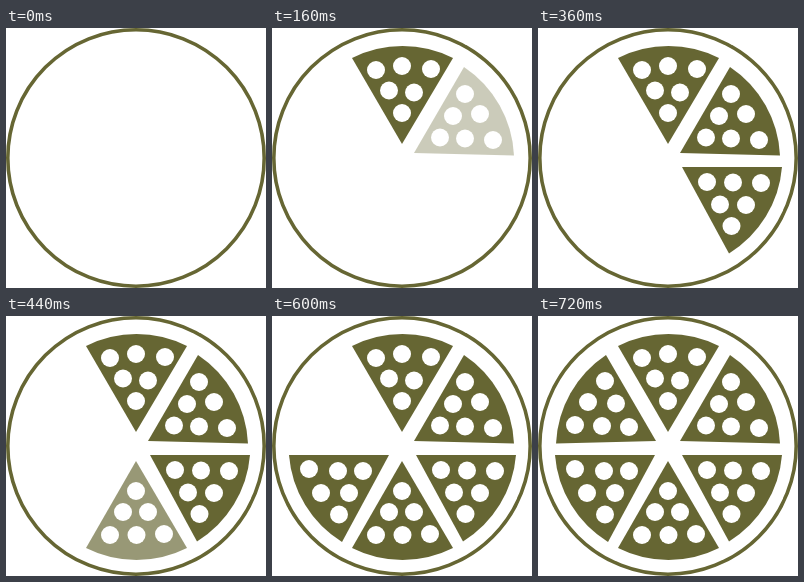
These frames come from a looping animation (260 px wide and 260 px high, 840 ms). An HTML page:

```html
<!DOCTYPE html>
<html lang="en">
<head>
<meta charset="utf-8">
<title>Slices</title>
<style>
  html, body { margin: 0; width: 100%; height: 100%; overflow: hidden; background: #fff; }
  svg { display: block; width: 100%; height: 100%; }
</style>
</head>
<body>
<svg id="stage" viewBox="0 0 260 260">
  <circle cx="130" cy="130" r="128.2" fill="none" stroke="#666633" stroke-width="3.6"/>
</svg>
<script>
const NS = 'http://www.w3.org/2000/svg';
const stage = document.getElementById('stage');
const LOOP = 840, STEP = 40, STEPS_PER_SLICE = 3, LAST_STEP = 18;

// tip, arc start and arc end (clockwise), then dot centres
const slices = [
  { edge: ['130 116', '80 30', '181 30'],
    dots: [[104, 42], [130, 38], [159, 41], [117, 62.5], [142, 64.5], [130, 85]] },
  { edge: ['142 125', '192 39', '242 127.5'],
    dots: [[193, 66], [181, 88], [208, 86], [168, 109.5], [193, 110.5], [221, 112]] },
  { edge: ['144 139', '244 139', '191 225.5'],
    dots: [[169, 154], [195, 154.5], [223, 155], [182, 176.5], [208, 177], [193.5, 198]] },
  { edge: ['130 145', '181 232', '80 232'],
    dots: [[130, 175], [117, 196], [142, 196], [104, 219], [130.5, 219], [158, 218]] },
  { edge: ['117 139', '70 226', '17 139'],
    dots: [[37, 153], [66, 155], [91, 155], [49, 177], [77, 177], [67, 198.5]] },
  { edge: ['118 125', '18 127.5', '68 39'],
    dots: [[67, 65], [50, 86], [78, 87.5], [37, 109], [64, 110], [91, 111]] }
];

function add(parent, tag, attrs) {
  const el = document.createElementNS(NS, tag);
  for (const key in attrs) el.setAttribute(key, attrs[key]);
  return parent.appendChild(el);
}

const groups = slices.map(({ edge: [tip, from, to], dots }) => {
  const g = add(stage, 'g', { opacity: 0 });
  add(g, 'path', { d: `M${tip}L${from}A112.5 112.5 0 0 1 ${to}Z`, fill: '#666633' });
  for (const [cx, cy] of dots) add(g, 'circle', { cx, cy, r: 9, fill: '#fff' });
  return g;
});

function draw(ms) {
  const step = Math.min(LAST_STEP, Math.floor((ms % LOOP) / STEP));
  groups.forEach((g, i) => {
    const shown = (step - i * STEPS_PER_SLICE) / STEPS_PER_SLICE;
    g.setAttribute('opacity', Math.max(0, Math.min(1, shown)));
  });
}

let start;
function tick(now) {
  if (start === undefined) start = now;
  draw(now - start);
  requestAnimationFrame(tick);
}
draw(0);
requestAnimationFrame(tick);
</script>
</body>
</html>
```
